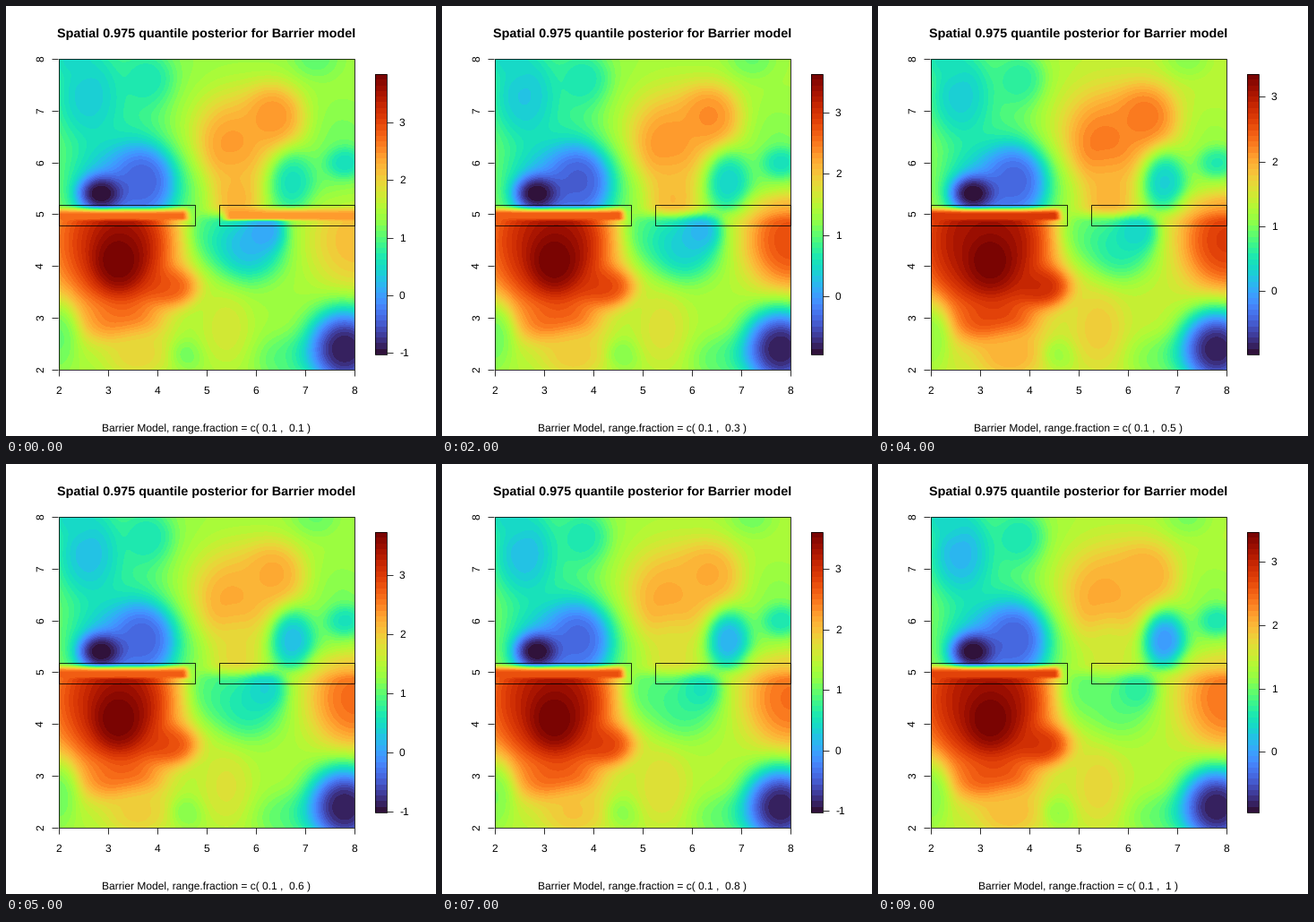
A matplotlib script that plays this animation: 480x480 px, repeating every 10 s.

```python
import numpy as np
import matplotlib.pyplot as plt
from matplotlib.animation import FuncAnimation
from matplotlib.patches import Rectangle

plt.rcParams["font.family"] = "Liberation Sans"
plt.rcParams["text.hinting"] = "none"

DPI = 80
PT = 72 / DPI
LEFT, RIGHT, TOP, BOTTOM = 59, 389, 59, 406
BAR_L, BAR_R, BAR_T, BAR_B = 412, 425, 76, 389
LEVELS = 50

# Value range of the colour scale in each scene
LOW = [-1.03, -.98, -.95, -.52, -.98, -1.02, -.79, -1.03, -.98, -.96]
HIGH = [3.84, 3.73, 3.63, 3.77, 3.35, 3.72, 3.95, 3.61, 3.53, 3.47]

gx = 2 + (np.arange(RIGHT - LEFT) + .5) * 6 / (RIGHT - LEFT)
gy = 8 - (np.arange(BOTTOM - TOP) + .5) * 6 / (BOTTOM - TOP)
X, Y = np.meshgrid(gx, gy)


def ramp(a, b, v):
    t = np.clip((v - a) / (b - a), 0, 1)
    return t * t * (3 - 2 * t)


def paint(base, *spots):
    """Pull a flat surface towards a level around each (x, y, rx, ry)."""
    z = np.full_like(X, base)
    for x, y, rx, ry, level in spots:
        q = ((X - x) / rx) ** 2 + ((Y - y) / ry) ** 2
        z += (level - z) * np.exp(-q ** 1.4)
    return z


def north(f, lo, east):
    return paint(
        1.35,
        (3.0, 7.1, 1.4, 1.6, .8),            # cool west
        (2.6, 7.3, .6, .8, .4 - .25 * f),
        (2.3, 8.0, .5, .4, .5 - .1 * f),
        (3.8, 7.6, .5, .5, .65 - .1 * f),
        (7.5, 6.2, .9, .9, 1.1),             # cool east
        (7.2, 8.0, .5, .4, 1.05),
        (7.8, 6.0, .4, .3, .55),
        (5.8, 6.7, 1.25, .9, 1.95),          # warm hill
        (5.5, 6.3, .65, .75, 2.45 - .35 * f),
        (6.35, 6.9, .6, .6, 2.5 - .45 * f),
        (5.6, 5.3, .55, .75, 2.3 - .75 * f),
        (6.75, 5.6, .45, .6, .65 - .7 * f),
        (8, 5, .9, .45, east - .6),
        (3.35, 5.45, 1.1, .95, -.05),        # cold pool on the barrier
        (3.7, 5.65, .6, .65, -.42),
        (2.85, 5.4, .45, .35, lo),
    )


def south(f, lo, hi, east):
    return paint(
        1.4,
        (3.0, 4.5, 1.55, 1.6, 3.05),         # hot mound
        (3.3, 2.95, .8, .45, 2.55),
        (3.6, 2.3, .7, .5, 1.95),
        (4.25, 3.6, .6, .4, 2.8),
        (3.3, 4.3, .8, 1.0, hi - .25),
        (3.2, 4.1, .45, .5, hi),
        (2.0, 2.6, .4, .7, 1.1),
        (4.65, 2.3, .35, .3, 1.15),
        (5.4, 2.8, .55, .8, 1.75),
        (5.1, 4.7, .5, .7, 1.0),             # cool bay
        (5.85, 4.4, .75, .7, .15 + .75 * f),
        (6.2, 4.7, .4, .4, .65 * f),
        (6.6, 2.2, .6, .5, 1.0),
        (8, 4.5, .95, 1.05, east),           # warm eastern mound
        (7.8, 2.4, .8, .8, lo + .1),         # cold corner
    )


def field(i):
    f, lo, hi = (i + 1) / 10, LOW[i], HIGH[i]
    seal = max(0, (.3 - f) / .2)             # eastern barrier fades out
    east = 2.95 - .55 * f - .75 * seal
    up, low = north(f, lo, east), south(f, lo, hi, east)
    open_mix = low + (up - low) * ramp(4.83, 5.17, Y)

    def through(level):
        z = low + (level - low) * ramp(4.85, 4.93, Y)
        return z + (up - z) * ramp(5.0, 5.19, Y)

    z = open_mix + ramp(4.72, 4.5, X) * (through(2.7) - open_mix)
    z += seal * ramp(5.25, 5.5, X) * (through(2.45) - z)
    return np.clip((z - lo) / (hi - lo), 0, 1)


fig = plt.figure(figsize=(6, 6), dpi=DPI, facecolor="white")
ax = fig.add_axes([0, 0, 1, 1])
ax.set_axis_off()
cmap = plt.get_cmap("turbo", LEVELS)


def text(x, y, s, size=12, **kw):
    kw = {"ha": "center", "va": "baseline", **kw}
    return ax.text(x, y, s, fontsize=size * PT, **kw)


def line(xs, ys):
    return ax.plot(xs, ys, color="black", lw=PT * .8,
                   solid_capstyle="butt")[0]


def box(x0, y0, x1, y1):
    ax.add_patch(Rectangle((x0 - .5, y0 - .5), x1 - x0, y1 - y0, fill=False,
                           ec="black", lw=PT * .8, zorder=3))


def show(data, *extent):
    return ax.imshow(data, cmap=cmap, vmin=0, vmax=1, aspect="auto",
                     interpolation="nearest", extent=extent)


heat = show(np.zeros_like(X), LEFT, RIGHT, BOTTOM, TOP)
show(np.linspace(1, 0, LEVELS)[:, None], BAR_L, BAR_R, BAR_B, BAR_T)
ax.set_xlim(0, 480)
ax.set_ylim(480, 0)

box(LEFT, TOP, RIGHT, BOTTOM)
box(LEFT, 222, 211, 245)
box(238, 222, RIGHT, 245)
box(BAR_L, BAR_T, BAR_R, BAR_B)

for v in range(2, 9):
    x = LEFT + (v - 2) * 55
    y = round(BOTTOM - (v - 2) * (BOTTOM - TOP) / 6)
    line([x - .5] * 2, [BOTTOM, BOTTOM + 7])
    text(x, 433, str(v))
    line([LEFT - 8, LEFT - 1], [y - .5] * 2)
    text(42, y - .5, str(v), rotation=90, rotation_mode="anchor")

text(224, 35, "Spatial 0.975 quantile posterior for Barrier model", 14.4,
     weight="bold")
caption = text(224, 476, "")
marks = [(v, line([BAR_R, BAR_R + 7], [0, 0]), text(439, 0, str(v), ha="left"))
         for v in range(-1, 4)]


def draw(i):
    lo, hi = LOW[i], HIGH[i]
    heat.set_data(field(i))
    caption.set_text(
        f"Barrier Model, range.fraction = c( 0.1 ,  {(i + 1) / 10:g} )")
    for v, tick, label in marks:
        y = BAR_T + (hi - v) / (hi - lo) * (BAR_B - BAR_T)
        tick.set_ydata([round(y) - .5] * 2)
        label.set_y(y + 4)
        for part in (tick, label):
            part.set_visible(y <= BAR_B)
    return heat, caption


anim = FuncAnimation(fig, draw, frames=10, interval=1000, repeat=True,
                     repeat_delay=0, blit=False)
plt.show()
```
